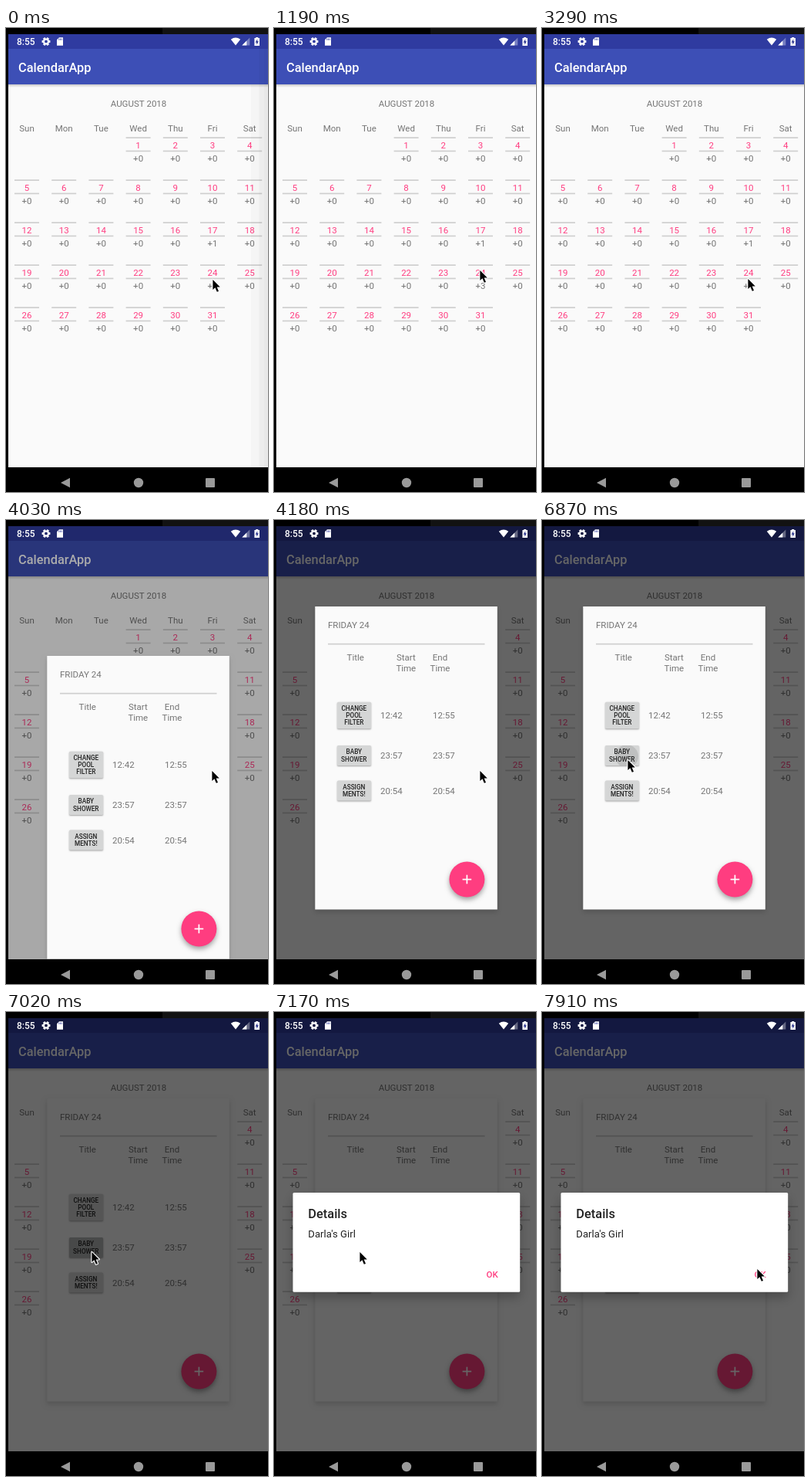
Write an HTML page with a canvas that moves like this. It is 340 by 601 pixels and loops after 8000 ms.

```html
<!DOCTYPE html>
<html lang="en">
<head>
<meta charset="utf-8">
<title>CalendarApp</title>
<style>
html, body { margin: 0; width: 100%; height: 100%; overflow: hidden; background: #000; }
canvas { display: block; width: 340px; height: 601px; }
</style>
</head>
<body>
<canvas id="stage"></canvas>
<script>
const W = 340, H = 601, LOOP = 8000;
const PINK = '#ff3d80', GREY = '#757575', PAGE = '#fafafa', RULE = '#cfcfcf';
const canvas = document.getElementById('stage');
const g = canvas.getContext('2d');
const dpr = window.devicePixelRatio || 1;
canvas.width = W * dpr;
canvas.height = H * dpr;

// Pointer stops: start time, x, y
const POINTER = [
  [0, 267, 325], [300, 267, 323], [450, 266, 317], [1040, 266, 313],
  [3140, 266, 320], [3290, 266, 324], [5230, 258, 324], [5380, 154, 329],
  [5530, 127, 325], [5680, 121, 319], [5830, 111, 311], [5980, 109, 310],
  [6280, 110, 310], [7460, 113, 311], [7610, 175, 317], [7760, 267, 329],
  [7910, 278, 332]
];

const EVENTS = [
  { y: 253, h: 34.5, label: ['CHANGE', 'POOL', 'FILTER'], start: '12:42', end: '12:55' },
  { y: 305, h: 26, label: ['BABY', 'SHOWER'], start: '23:57', end: '23:57' },
  { y: 350.5, h: 26, label: ['ASSIGN', 'MENTS!'], start: '20:54', end: '20:54' }
];

function rect(x, y, w, h, color) {
  g.fillStyle = color;
  g.fillRect(x, y, w, h);
}

function poly(points, color) {
  g.fillStyle = color;
  g.beginPath();
  points.forEach(([x, y]) => g.lineTo(x, y));
  g.closePath();
  g.fill();
}

function disc(x, y, r, color) {
  g.fillStyle = color;
  g.beginPath();
  g.arc(x, y, r, 0, Math.PI * 2);
  g.fill();
}

// Text centred vertically on its capitals
function text(str, x, cy, { size = 11.5, color = GREY, weight = 400, align = 'center' } = {}) {
  g.font = `${weight} ${size}px Roboto, sans-serif`;
  g.textAlign = align;
  g.fillStyle = color;
  g.fillText(str, x, cy + size * 0.355);
}

function withShadow(color, blur, dy, draw) {
  g.save();
  g.shadowColor = color;
  g.shadowBlur = blur * dpr;
  g.shadowOffsetY = dy * dpr;
  draw();
  g.restore();
}

function roundPath(x, y, w, h, r) {
  g.beginPath();
  g.roundRect(x, y, w, h, r);
}

function page() {
  rect(0, 0, W, H, '#000');
  rect(203, 0, 137, 8, '#121212');
  rect(3, 8, 337, 561, PAGE);
  rect(3, 8, 337, 19.5, '#2f3ba0');
  rect(3, 27, 337, 46, '#3d4fb6');
  const fade = g.createLinearGradient(0, 73, 0, 77);
  fade.addColorStop(0, 'rgba(0,0,0,.2)');
  fade.addColorStop(1, 'rgba(0,0,0,0)');
  rect(3, 73, 337, 4, fade);
  text('CalendarApp', 16, 51, { size: 16.4, weight: 500, color: '#fff', align: 'left' });
  text('AUGUST 2018', 172, 98);

  const colX = i => 27 + i * 48.2;
  ['Sun', 'Mon', 'Tue', 'Wed', 'Thu', 'Fri', 'Sat'].forEach((d, i) => text(d, colX(i), 130));
  for (let day = 1; day <= 31; day++) {
    const cell = day + 2;
    const x = colX(cell % 7), y = 151.5 + 55 * Math.floor(cell / 7);
    rect(x - 16, y - 10.2, 32, 1.7, RULE);
    rect(x - 16, y + 7.1, 32, 1.7, RULE);
    text(day, x, y, { color: PINK });
    text('+' + ({ 17: 1, 24: 3 }[day] || 0), x, y + 17.3);
  }
}

function edgeShade() {
  rect(318, 73, 22, 496, 'rgba(0,0,0,.02)');
  rect(328.5, 27, 11.5, 542, 'rgba(0,0,0,.03)');
  rect(335, 27, 5, 542, 'rgba(0,0,0,.02)');
}

function dim(alpha) {
  rect(3, 8, 337, 561, `rgba(0,0,0,${alpha})`);
}

function statusIcons() {
  text('8:55', 14, 17.7, { size: 12, weight: 500, color: '#fff', align: 'left' });

  // Settings gear
  for (let i = 0; i < 6; i++) {
    g.save();
    g.translate(52, 17.5);
    g.rotate(i * Math.PI / 3 + Math.PI / 6);
    rect(-1.5, -5.4, 3, 3, '#fff');
    g.restore();
  }
  g.strokeStyle = '#fff';
  g.lineWidth = 2.2;
  g.beginPath();
  g.arc(52, 17.5, 3, 0, Math.PI * 2);
  g.stroke();

  // Memory card
  poly([[69, 12.3], [74, 12.3], [74, 22.8], [66, 22.8], [66, 15.3]], '#fff');
  for (let i = 0; i < 3; i++) rect(68.4 + i * 1.7, 13.6, 0.8, 2.2, '#2f3ba0');

  // Wi-Fi, signal, battery
  g.fillStyle = '#fff';
  g.beginPath();
  g.moveTo(298, 22.5);
  g.lineTo(291.8, 14.8);
  g.quadraticCurveTo(298, 10, 304.2, 14.8);
  g.closePath();
  g.fill();
  poly([[316.3, 12.5], [316.3, 22.5], [306.3, 22.5]], 'rgba(255,255,255,.35)');
  poly([[312.3, 16.5], [312.3, 22.5], [306.3, 22.5]], '#fff');
  rect(324.2, 12, 3, 1.5, '#fff');
  rect(322.4, 13, 6.6, 10, '#fff');
  poly([[326.2, 14.2], [323.7, 18.8], [325.3, 18.8], [325.3, 21.8], [327.8, 17.2], [326.2, 17.2]], '#26308c');
}

function navBar() {
  const c = '#9a9a9a';
  rect(0, 569, W, 32, '#000');
  poly([[71, 589], [83, 582.7], [83, 595.3]], c);
  disc(172, 589, 6.2, c);
  roundPath(259, 583, 12, 12, 1);
  g.fill();
}

// press: 0 idle, 1 ripple growing, 2 fully pressed
function eventButton(ev, press) {
  const top = ev.y - ev.h / 2;
  withShadow('rgba(0,0,0,.35)', 2, 1, () => {
    roundPath(82, top, 44, ev.h, 1.5);
    g.fillStyle = '#d5d6d6';
    g.fill();
  });
  if (press) {
    g.save();
    roundPath(82, top, 44, ev.h, 1.5);
    g.clip();
    disc(110, 306, press === 1 ? 15 : 50, press === 1 ? 'rgba(0,0,0,.1)' : 'rgba(0,0,0,.15)');
    g.restore();
  }
  ev.label.forEach((line, i) => {
    const dy = (i - (ev.label.length - 1) / 2) * 9.4;
    text(line, 103.8, ev.y + dy, { size: 8.2, weight: 500, color: '#222' });
  });
}

function dayDialog(dy, press) {
  g.save();
  g.beginPath();
  g.rect(3, 8, 337, 561);
  g.clip();
  g.translate(0, dy);
  withShadow('rgba(0,0,0,.15)', 6, 3, () => rect(53.3, 112, 236.5, 392.5, PAGE));
  text('FRIDAY 24', 70, 136.3, { align: 'left' });
  rect(70, 159.8, 203.5, 1.7, RULE);
  text('Title', 105.7, 178.3);
  [['Start', 171.3], ['End', 215.5]].forEach(([word, x]) => {
    text(word, x, 178.3);
    text('Time', x, 191.7);
  });
  EVENTS.forEach((ev, i) => {
    eventButton(ev, i === 1 ? press : 0);
    text(ev.start, 138, ev.y + 0.3, { align: 'left' });
    text(ev.end, 206, ev.y + 0.3, { align: 'left' });
  });
  withShadow('rgba(0,0,0,.35)', 6, 3.5, () => disc(250.4, 465.5, 23, PINK));
  rect(244.6, 464.7, 11.6, 1.7, '#fff');
  rect(249.55, 459.7, 1.7, 11.6, '#fff');
  g.restore();
}

function detailsDialog() {
  withShadow('rgba(0,0,0,.25)', 14, 7, () => {
    roundPath(24.5, 234, 294.7, 128.8, 1.6);
    g.fillStyle = '#fff';
    g.fill();
  });
  text('Details', 44.3, 261, { size: 16.4, weight: 500, color: '#212121', align: 'left' });
  text("Darla's Girl", 44.3, 287, { size: 13.1, color: '#212121', align: 'left' });
  text('OK', 283.2, 340.3, { weight: 500, color: PINK });
}

function pointer(t) {
  const [, x, y] = POINTER.filter(p => p[0] <= t).pop();
  g.save();
  g.translate(x, y);
  g.beginPath();
  [[1.4, 1], [1.4, 14], [4.4, 11.3], [6.8, 16.8], [9, 15.9], [6.7, 10.4], [10.8, 10.4]]
    .forEach(([px, py]) => g.lineTo(px, py));
  g.closePath();
  g.lineJoin = 'round';
  g.lineWidth = 2.2;
  g.strokeStyle = '#fff';
  g.stroke();
  g.fillStyle = '#000';
  g.fill();
  g.restore();
}

function draw(t) {
  g.setTransform(dpr, 0, 0, dpr, 0, 0);
  const opening = t < 4180;
  const details = t >= 7020;
  page();
  if (t < 1190) edgeShade();
  if (t >= 4030) {
    // The dim layer moves above the day dialog once the details open
    if (!details) dim(opening ? 0.33 : 0.6);
    dayDialog(opening ? 64 : 0, details ? 2 : t >= 6870 ? 1 : 0);
    if (details) dim(0.6);
  }
  if (t >= 7170) detailsDialog();
  statusIcons();
  navBar();
  pointer(t);
}

const begin = performance.now();
function tick() {
  draw((performance.now() - begin) % LOOP);
  requestAnimationFrame(tick);
}
tick();
</script>
</body>
</html>
```
